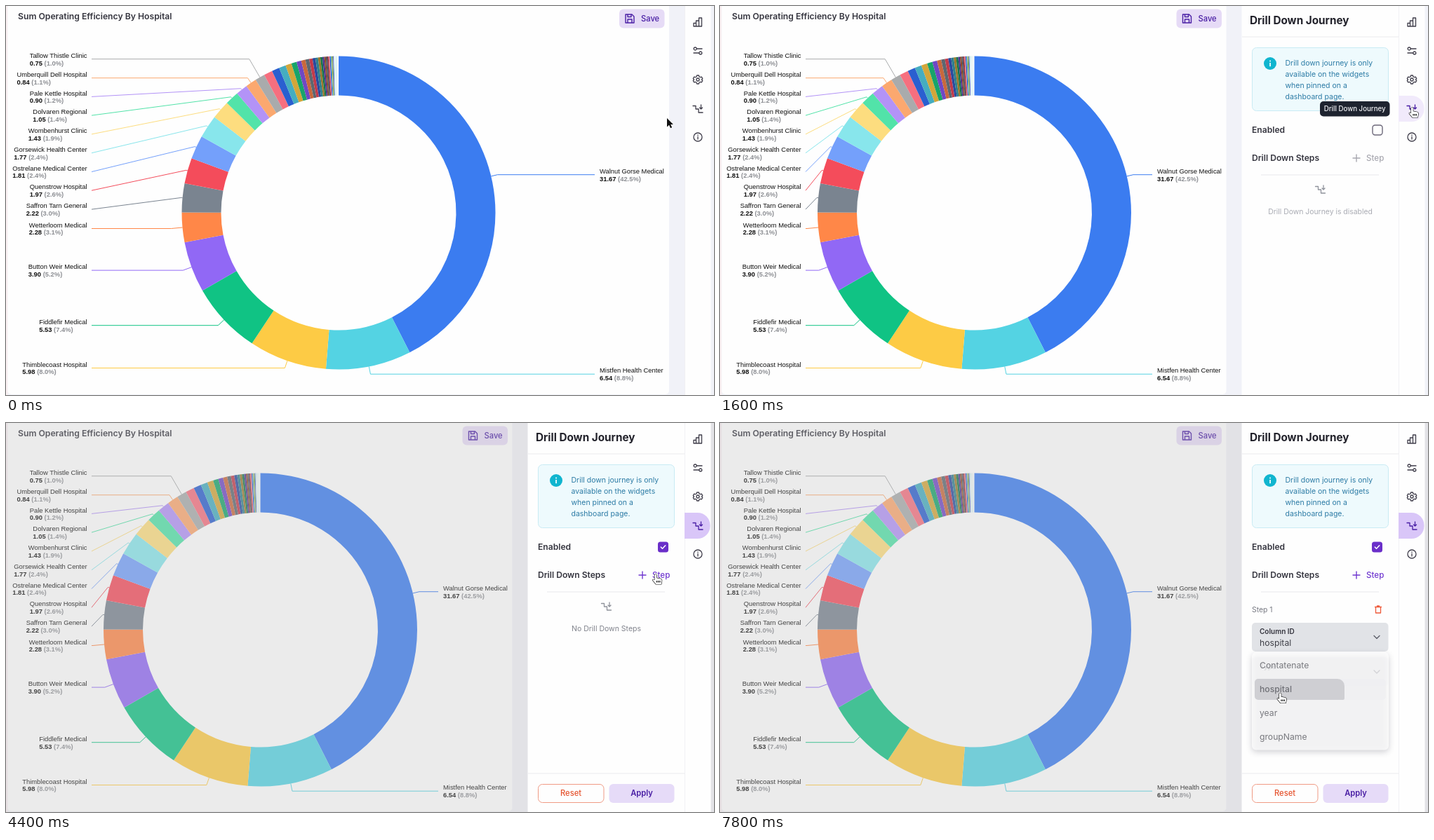
Write an HTML page with a canvas that moves like this. It is 1009 by 555 pixels and loops after 8 s.

```html
<!DOCTYPE html>
<html lang="en">
<head>
<meta charset="utf-8">
<title>Drill down journey</title>
<style>
html, body { margin: 0; width: 100%; height: 100%; overflow: hidden; background: #f1f2f8; }
canvas { display: block; width: 100vw; height: 100vh; }
</style>
</head>
<body>
<canvas id="stage"></canvas>
<script>
const W = 1009, H = 555, LOOP = 8000, TICK = 200;
const canvas = document.getElementById('stage');
const c = canvas.getContext('2d');
const dpr = window.devicePixelRatio || 1;
canvas.width = W * dpr;
canvas.height = H * dpr;

const UI = 'Inter, sans-serif', CHART = '"Liberation Sans", Arial, sans-serif';
const PURPLE = '#6a2fc9', DEEP = '#4a1fa5', INK = '#35353f', MUTED = '#a9abb3';
const TOTAL = 74.5, R = 223.5, HOLE = 167.5, CY = 295;

// name, value, share, label centre y, colour
const slices = [
  ['Walnut Gorse Medical', 31.67, '42.5', 240.7, '#3b7cf0'],
  ['Mistfen Health Center', 6.54, '8.8', 525.2, '#54d3e3'],
  ['Thimblecoast Hospital', 5.98, '8.0', 516.5, '#fdcb45'],
  ['Fiddlefir Medical', 5.53, '7.4', 455.7, '#10c384'],
  ['Button Weir Medical', 3.90, '5.2', 377.1, '#9168f5'],
  ['Wetterloom Medical', 2.28, '3.1', 317.5, '#ff8748'],
  ['Saffron Tarn General', 2.22, '3.0', 290.1, '#7a8490'],
  ['Quenstrow Hospital', 1.97, '2.6', 263.2, '#f44c5b'],
  ['Ostrelane Medical Center', 1.81, '2.4', 236.5, '#74a0fb'],
  ['Gorsewick Health Center', 1.77, '2.4', 209.7, '#88e6ec'],
  ['Wombenhurst Clinic', 1.43, '1.9', 182.9, '#fddd7f'],
  ['Dolvaren Regional', 1.05, '1.4', 156.1, '#52e3a9'],
  ['Pale Kettle Hospital', 0.90, '1.2', 129.4, '#b393f7'],
  ['Umberquill Dell Hospital', 0.84, '1.1', 102.7, '#fba86f'],
  ['Tallow Thistle Clinic', 0.75, '1.0', 75.7, '#a9abac']
];
const smallColors = ['#f66f7f', '#2a5fd0', '#45adc0', '#d3a63a', '#18a46a', '#6f48c4', '#c9683c',
  '#5d6770', '#c23b4a', '#2a4a9e', '#2f7f8c', '#98782c', '#14744c', '#4d3390', '#8c4a2b',
  '#4a5560', '#8a2f3c'];
const paleColors = ['#8fe3ee', '#fcfcfd', '#fdf4dc', '#e2edfc'];

const icons = {
  bars: 'M-6 6V1.5h3.5V6zM-2.5 6V-2h4V6zM1.5 6V-6H5.5V6z',
  sliders: 'M-1.5-3H6M-6 3H1.5M-5.8-3a2 2 0 1 0 4 0a2 2 0 1 0-4 0M1.8 3a2 2 0 1 0 4 0a2 2 0 1 0-4 0',
  gear: 'M-1.4-6h2.8l.5 1.8 1.6.9 1.8-.5L6.7-1.4 5.4 0l1.3 1.4-1.4 2.4-1.8-.5-1.6.9L1.4 6h-2.8l-.5-1.8-1.6-.9-1.8.5-1.4-2.4L-5.4 0l-1.3-1.4 1.4-2.4 1.8.5 1.6-.9zM-2 0a2 2 0 1 0 4 0a2 2 0 1 0-4 0',
  stairs: 'M-7-4.5h4v4.5h4v5h6M4.5-6V0M2.5-2l2 2 2-2',
  info: 'M-6 0a6 6 0 1 0 12 0a6 6 0 1 0-12 0M0-.5V3M0-3v.6',
  save: 'M-6-6H3l3 3V6H-6zM-3-6v3.5h5V-6M-3 6V1h6v5',
  plus: 'M-5 0H5M0-5V5',
  trash: 'M-4.5-3.5h9M-1.5-3.5v-1.5h3v1.5M-3.5-3.5v8.5h7v-8.5',
  down: 'M-4-2L0 2l4-4',
  up: 'M-4 2L0-2l4 4',
  check: 'M-3.2 0l2.2 2.3 4.2-4.5'
};
const arrowShape = new Path2D('M0 0V12.5L3 9.8 5 14.3 7.2 13.3 5.2 9H9z');
const handShape = new Path2D('M-1.5 1.2C-1.5-.7 1.2-.7 1.2 1.2V5.2l5.6 1.1c1.6.4 2 1.4 1.8 3L7.8 14H.4L-4 8.8C-4.8 7.4-3.2 6.6-1.5 8.2z');

// time, x, y of the pointer tip
const path = [[200, 942, 160], [800, 986.5, 145], [1700, 986.5, 145], [2200, 974, 160], [2600, 960, 168],
  [3000, 942, 177], [3700, 942, 177], [4300, 926, 216], [4800, 926, 216], [5500, 844.5, 310],
  [6800, 844.5, 310], [7400, 798.5, 385.5]];

const clamp = (v, lo, hi) => Math.max(lo, Math.min(hi, v));
const ramp = (t, a, b) => clamp((t - a) / (b - a), 0, 1);
const mix = (a, b, k) => a + (b - a) * k;

function text(s, x, y, size, color, weight = 400, align = 'left', family = UI) {
  c.font = `${weight} ${size}px ${family}`;
  c.textAlign = align;
  c.fillStyle = color;
  c.fillText(s, x, y + size * 0.36);
}

function rect(x, y, w, h, color) {
  c.fillStyle = color;
  c.fillRect(x, y, w, h);
}

function box(x, y, w, h, r, fill, stroke, width = 1) {
  c.beginPath();
  c.roundRect(x, y, w, h, r);
  if (fill) { c.fillStyle = fill; c.fill(); }
  if (stroke) { c.strokeStyle = stroke; c.lineWidth = width; c.stroke(); }
}

function dot(x, y, r, color) {
  c.beginPath();
  c.arc(x, y, r, 0, 7);
  c.fillStyle = color;
  c.fill();
}

function icon(name, x, y, color, width = 1.3) {
  c.save();
  c.translate(x, y);
  c.strokeStyle = color;
  c.lineWidth = width;
  c.lineJoin = c.lineCap = 'round';
  c.stroke(new Path2D(icons[name]));
  c.restore();
}

function ring(cx, from, to, color) {
  c.beginPath();
  c.arc(cx, CY, R, from - Math.PI / 2, to - Math.PI / 2);
  c.arc(cx, CY, HOLE, to - Math.PI / 2, from - Math.PI / 2, true);
  c.fillStyle = color;
  c.fill();
}

function label([name, value, share, y, color], mid, cx, right) {
  const dx = Math.sin(mid), dy = -Math.cos(mid);
  const x1 = cx + R * dx, y1 = CY + R * dy;
  const len = clamp((y - y1) / dy, 2, 31);
  const onRight = dx > 0;
  c.beginPath();
  c.moveTo(x1, y1);
  c.lineTo(x1 + len * dx, y1 + len * dy);
  c.lineTo(onRight ? right - 7 : 122, y);
  c.strokeStyle = color;
  c.lineWidth = 1;
  c.stroke();

  c.font = `9.4px ${CHART}`;
  const x = onRight ? right : 115.5 - c.measureText(name).width;
  const num = value.toFixed(2);
  text(name, x, y - 5.2, 9.4, '#111', 400, 'left', CHART);
  text(num, x, y + 5.5, 9.4, '#111', 700, 'left', CHART);
  const w = c.measureText(num + ' ').width;
  text(`(${share}%)`, x + w, y + 5.5, 9.4, '#8d8f94', 700, 'left', CHART);
}

function chart(narrow) {
  const cx = narrow ? 362.5 : 474, right = narrow ? 623 : 846;
  const turn = 2 * Math.PI;
  let a = 0;
  const labels = [];
  for (const s of slices) {
    const next = a + s[1] / TOTAL * turn;
    ring(cx, a, next, s[4]);
    labels.push([s, (a + next) / 2]);
    a = next;
  }
  // the rest shrinks geometrically towards the top
  const ratio = 0.887;
  let step = (turn - a) * (1 - ratio);
  for (let i = 0; i < 36; i++, step *= ratio) {
    const color = i < 23 ? smallColors[i % smallColors.length] : paleColors[i % paleColors.length];
    ring(cx, a, a + step, color);
    a += step;
  }
  for (const [s, mid] of labels) label(s, mid, cx, right);
}

function card(t, slide) {
  const right = mix(945, 721.5, slide);
  rect(0, 0, 2.5, H, '#f9eff1');
  box(2.5, -10, right - 2.5, 564, 5, '#fefefe');
  c.save();
  c.beginPath();
  c.rect(0, 0, right, H);
  c.clip();
  text('Sum Operating Efficiency By Hospital', 17, 14.5, 12.2, INK, 600);
  chart(t >= 1600);
  c.restore();
  const x = right - 71;
  box(x, 4.5, 64.5, 27, 6, '#e6dbf6');
  icon('save', x + 15, 18, DEEP, 1.4);
  text('Save', x + 31, 18, 11.2, DEEP, 500);
}

function menu(t) {
  const opening = t < 6200, closing = t >= 7800;
  c.save();
  c.globalAlpha = opening ? 0.2 : closing ? 0.75 : 1;
  c.translate(855.5, 327);
  if (opening) c.scale(0.83, 0.7);
  c.translate(-855.5, -327);
  c.shadowColor = 'rgba(40,40,60,.28)';
  c.shadowBlur = 9 * dpr;
  c.shadowOffsetY = 3 * dpr;
  box(758, 327, 195, 139.5, 6, '#fefefe');
  c.shadowColor = 'transparent';
  if (t >= 7400) box(762, 365, 187, 30, 5, '#efeff2');
  if (closing) box(762, 365, 128, 30, [5, 10, 2, 5], '#c4c4c8');
  ['Contatenate', 'hospital', 'year', 'groupName'].forEach((s, i) =>
    text(s, 769, 346 + 34 * i, 12.2, '#4f5057', i == 1 && t >= 7400 ? 500 : 400));
  c.restore();
}

function stepForm(t) {
  const open = t >= 5800 && t < 7800;
  text('Step 1', 758, 266, 10.4, '#777982');
  icon('trash', 938, 266, '#ee5a3a');
  box(758, 285, 194.5, 41, 5, t >= 5400 ? '#e1e3e7' : '#f4f5f7');
  if (t < 6200) text('Column ID', 769, t < 5800 ? 305 : 302, 11.7, '#62646d', 500);
  else text('Column ID', 769, 297.5, 10, INK, 600);
  if (t >= 7800) text('hospital', 769, 313.5, 12.2, '#3f4048');
  icon(open ? 'up' : 'down', 936, 305.5, '#5c5e68');
  box(758, 334, 194.5, 41, 5, '#f5f6f8');
  text('Type', 769, 347, 10.2, '#75777f', 500);
  icon('down', 936, 355, '#5c5e68');
  if (t >= 5800) menu(t);
}

function checkbox(t) {
  const checked = t >= 3200;
  if (t >= 3000 && t < 4000)
    dot(937, 177, 16, checked && t < 3600 ? 'rgba(106,47,201,.17)' : 'rgba(106,47,201,.07)');
  if (!checked) return box(930, 170, 14, 14, 3.5, null, '#6c687a', 1.4);
  box(929, 169.5, 15, 15, 3.5, PURPLE);
  icon('check', 936.5, 177, '#fff', 1.5);
}

function panel(t, slide) {
  const on = t >= 3200;
  c.save();
  c.beginPath();
  c.rect(0, 0, 967, H);
  c.clip();
  c.translate(223.5 * (1 - slide), 0);
  rect(743.5, 0, 224, H, '#fefefe');
  text('Drill Down Journey', 755, 20.5, 15.3, '#22222b', 700);
  rect(744, 43.5, 223, 1, '#ececf0');

  box(758.5, 59.5, 194, 90, 6, '#eefafd', '#c9ebf4');
  dot(784, 82, 9, '#10b5cf');
  rect(783.2, 81, 1.7, 5.2, '#fff');
  rect(783.2, 77.6, 1.7, 1.8, '#fff');
  ['Drill down journey is only', 'available on the widgets', 'when pinned on a', 'dashboard page.']
    .forEach((s, i) => text(s, 805.5, 81 + 16 * i, 10.5, '#2c7ba5'));

  text('Enabled', 758, 177, 12.1, INK, 600);
  checkbox(t);
  text('Drill Down Steps', 758, 217, 12.1, INK, 600);
  const action = on ? '#7038d0' : '#a8a8b0';
  icon('plus', 907, 217, action, 1.4);
  text('Step', 921, 217, 11.6, action, 500);
  rect(771, 240.5, 168, 1, '#e9e9ed');

  if (t >= 4600) stepForm(t);
  else {
    icon('stairs', 855.5, 262, '#8f929b');
    if (t < 3400) {
      c.globalAlpha = on ? 0.12 : 1;
      text('Drill Down Journey is disabled', 855.5, 293, 10.4, MUTED, 400, 'center');
      c.globalAlpha = 1;
    }
    if (on) text('No Drill Down Steps', 855.5, 293, 10.5, '#80838c', 400, 'center');
  }
  if (on) {
    rect(744, 499.5, 223, 1, '#ececf0');
    box(758.5, 515.5, 93.5, 26, 6, '#fefefe', '#f09a84');
    text('Reset', 805, 528, 11.2, '#e5532e', 500, 'center');
    box(859.5, 515, 93, 27, 6, '#e6dbf8');
    text('Apply', 906, 528, 11.2, DEEP, 600, 'center');
  }
  c.restore();
}

function rail(t) {
  rect(967, 0, 37.5, H, '#fefefe');
  rect(967, 0, 1, H, '#f0f0f4');
  if (t >= 1200) box(967, 128, 36.5, 37, [0, 18, 18, 0], t >= 1800 ? '#d9c6f8' : '#f1eafb');
  if (t == 1400) dot(986, 147, 13.5, '#d6c3f2');
  ['bars', 'sliders', 'gear', 'stairs', 'info'].forEach((name, i) =>
    icon(name, 986, [23, 64, 105, 147, 187][i], name == 'stairs' && t >= 1200 ? DEEP : '#3f3d4a'));
}

function tooltip(t) {
  if (t < 1200 || t > 1800) return;
  box(855, 136, 99.5, 21.5, 5, '#1e232f');
  text('Drill Down Journey', 904.7, 146.5, 9.7, '#f4f5f8', 500, 'center');
}

function cursor(t) {
  const i = path.findIndex(p => p[0] > t);
  const b = path[i < 0 ? path.length - 1 : i];
  const a = i < 0 ? b : path[Math.max(0, i - 1)];
  const k = a === b ? 0 : ramp(t, a[0], b[0]);
  const ease = k * k * (3 - 2 * k);
  const hand = (t >= 800 && t < 2200) || (t >= 3000 && t < 3800) || (t >= 4200 && t < 5000) || t >= 7400;
  const shape = hand ? handShape : arrowShape;
  c.save();
  c.translate(mix(a[1], b[1], ease), mix(a[2], b[2], ease));
  c.lineJoin = 'round';
  c.lineWidth = hand ? 1.2 : 1.6;
  c.strokeStyle = hand ? '#111' : '#fff';
  c.fillStyle = hand ? '#fff' : '#111';
  c.stroke(shape);
  c.fill(shape);
  if (hand) c.stroke(new Path2D('M1.5 9v2.5M3.7 9v2.5M5.9 9v2.5'));
  c.restore();
}

function draw(t) {
  const slide = ramp(t, 1200, 1600) ** 1.13;
  c.setTransform(dpr, 0, 0, dpr, 0, 0);
  rect(0, 0, W, H, '#f1f2f8');
  card(t, slide);
  if (t >= 3200) rect(0, 0, W, H, 'rgba(190,190,190,.3)');
  panel(t, slide);
  rail(t);
  tooltip(t);
  cursor(t);
}

// the picture advances five times a second
function frame() {
  draw(Math.floor(performance.now() % LOOP / TICK) * TICK);
  requestAnimationFrame(frame);
}
frame();
</script>
</body>
</html>
```
